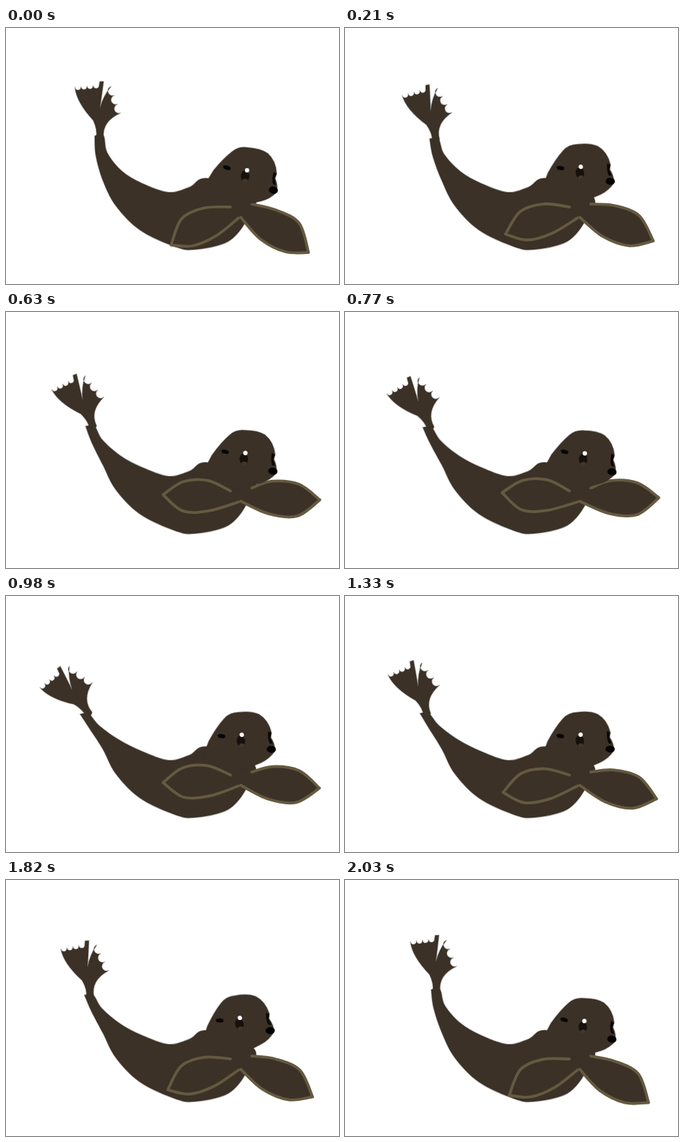
Recreate the animation shown at these times as an HTML page. Size 454 by 349 pixels, loop 2100 ms.

```html
<!DOCTYPE html>
<html lang="en">
<head>
<meta charset="utf-8">
<title>Seal</title>
<style>
  html, body { margin: 0; width: 100%; height: 100%; overflow: hidden; background: #fff; }
  svg { display: block; width: 454px; height: 349px; }
  .skin { fill: #3b3127; stroke: #3b3127; stroke-opacity: .35; stroke-width: 1.6; stroke-linejoin: round; }
  .flipper { fill: #3b3127; stroke: #655a40; stroke-width: 3.8; stroke-linecap: round; stroke-linejoin: round; }
</style>
</head>
<body>
<svg viewBox="0 0 454 349">
  <path id="body" class="skin"/>
  <path id="fluke" class="skin"/>
  <path id="right" class="flipper"/>
  <g id="head">
    <path class="skin" d="M272 212 L283 194 Q297 177 309 168 Q318 161 330 163 Q347 164 357 171 Q368 181 369 198 L367 205 Q371 215 369 224 Q360 233 348 236 L330 240 L296 243Z"/>
    <path d="M296 188 Q301 186 306 190 Q307 193 304 194 L297 192Z" fill="#080605"/>
    <ellipse cx="326" cy="202" rx="5.8" ry="7.5" fill="#17110d"/>
    <ellipse cx="326" cy="208" rx="3.5" ry="2.5" fill="#43362b"/>
    <circle cx="328.7" cy="194" r="3" fill="#fff"/>
    <path d="M365 196 Q362 205 364 213 L368 214 L366 205 L369 199Z" fill="#0b0806"/>
    <ellipse cx="364.5" cy="221" rx="6.3" ry="4.8" transform="rotate(12 364.5 221)" fill="#030202"/>
  </g>
  <path id="left" class="flipper"/>
</svg>
<script>
const FRAME = 70, COUNT = 30, POSE = 5;
const set = (id, name, value) => document.getElementById(id).setAttribute(name, value);

// Key poses, one every POSE frames
const nod = [0, -18, 0, -13.5, -10.5, -18, 0];
const bend = [0, .47, .66, 1.08, .9, .88, 0];
const curl = [0, -17.6, -22, -38, -13, -6.4, 0];

function pose(keys, frame) {
  const i = Math.floor(frame / POSE), t = frame / POSE - i;
  return keys[i] + (keys[i + 1] - keys[i]) * t;
}

// Flippers rise for a third of the loop, then sink back
const lift = frame => frame < 10 ? 28.5 - 3.2 * frame : 1.6 * (frame - 10) - 3.5;

// Smooth Bezier segments through the points, without the initial move
function curve(pts) {
  const at = i => pts[Math.min(pts.length - 1, Math.max(0, i))];
  const handle = (p, from, to) => p.map((v, k) => v + (to[k] - from[k]) / 6);
  return pts.slice(1).map((end, i) =>
    `C${handle(pts[i], at(i - 1), end)} ${handle(end, at(i + 2), pts[i])} ${end}`).join("");
}

// A run of n hollow arcs
const scallops = (n, dx, dy) => `a4 4 0 0 0 ${dx / n} ${dy / n}`.repeat(n);

const trunk = [
  [121, 147], [122.5, 174], [132.5, 209], [149.5, 242], [182, 275], [230, 298], [258, 302],
  [303, 291], [328, 262], [338, 230], [275, 205], [250, 217], [222, 224], [186, 212],
  [158, 195], [138, 170], [133, 147], [121, 147]
];

// The higher up the tail, the further it sways
function sway([x, y], amount) {
  const weight = Math.max(0, (212 - y) / 65) ** 1.5 * amount;
  return [x - 20 * weight, y + 14 * weight];
}

// Leaf shape in polar steps [angle, radius]; its sides lag behind the tip
function flipper(id, side, [px, py], top, bottom, angle) {
  const size = 1 + .04 * side, turn = angle - 10.9;
  const at = (base, radius, gain = .8) => {
    const a = (base + 2 * side + gain * turn) * Math.PI / 180;
    return [px + side * size * radius * Math.cos(a), py + size * radius * Math.sin(a)];
  };
  const tip = at(12, 101, 1);
  const upper = [top, at(-20, 43), at(-5, 75), tip];
  const lower = [tip, at(27, 76), at(41, 42), bottom];
  set(id, "d", `M${top}${curve(upper)}${curve(lower)}`);
}

function draw(frame) {
  const amount = pose(bend, frame);
  const outline = trunk.map(p => sway(p, amount));
  set("body", "d", `M${outline[0]}${curve(outline)}Z`);
  set("fluke", "transform", `translate(${-20 * amount} ${14 * amount}) rotate(${pose(curl, frame)} 128 140)`);
  set("head", "transform", `rotate(${pose(nod, frame)} 300 230)`);
  flipper("right", 1, [323, 251], [335, 240], [320, 258], lift(frame));
  flipper("left", -1, [311, 251], [306, 244], [317, 259], lift(frame));
}

set("fluke", "d", "M123 149 Q125 139 119 126 Q96 101 94 81" + scallops(4, 33, -3) +
  "L128 73 L133 73 Q132 82 128 109 Q133 92 143 80" + scallops(3, 13, 36) +
  "Q131 127 133 149 Q128 154 123 149Z");

const start = performance.now();
function tick() {
  draw(Math.floor((performance.now() - start) / FRAME) % COUNT);
  requestAnimationFrame(tick);
}
tick();
</script>
</body>
</html>
```
